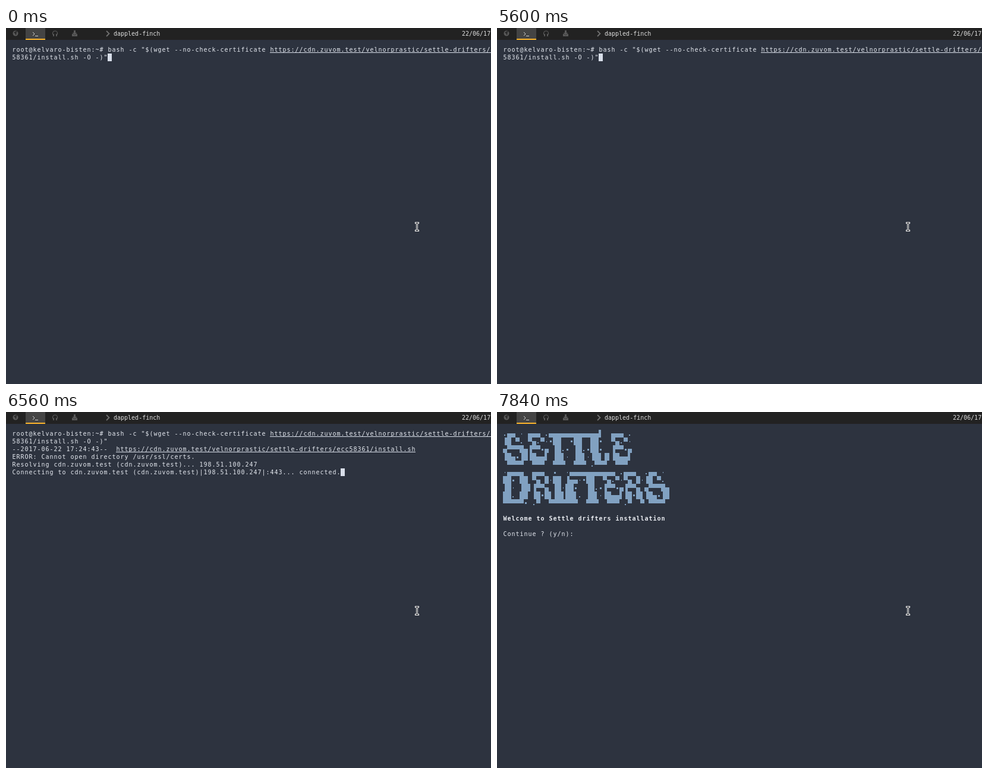
Recreate the animation shown at these times as an HTML page with a canvas. Size 816x600 px, loop 8 s.

```html
<!DOCTYPE html>
<html lang="en">
<head>
<meta charset="utf-8">
<title>Terminal installation</title>
<style>
html, body { margin: 0; width: 100%; height: 100%; overflow: hidden; background: #2d333f; }
canvas { display: block; }
</style>
</head>
<body>
<canvas id="stage" width="816" height="600"></canvas>
<script>
const ctx = document.getElementById('stage').getContext('2d');
const LOOP = 8000;
const CELL_W = 7, CELL_H = 13, LEFT = 10, TOP = 30;
const FONT = '"DejaVu Sans Mono", monospace';
const TEXT = '#e5e9f0', BLOCK = '#d8dee9', BLUE = '#81a1c1', GREY = '#595959';

const HOST = 'cdn.zuvom.test';
const IP = '198.51.100.247';
const URL_BASE = `https://${HOST}/velnorprastic/settle-drifters/`;
const FILE = 'ecc58361/install.sh';
const COMMAND = 'root@kelvaro-bisten:~# bash -c "$(wget --no-check-certificate ';
const STAMP = '--2017-06-22 17:24:43--  ';
const RESOLVING = `Resolving ${HOST} (${HOST})... `;
const CONNECTING = `Connecting to ${HOST} (${HOST})|${IP}|:443... connected.`;
const PROMPT = 'Continue ? (y/n): ';

const LETTERS = {
  S: ['.▄▄ · ', '▐█ ▀. ', '▄▀▀▀█▄', '▐█▄▪▐█', ' ▀▀▀▀ '],
  E: ['▄▄▄ .', '▀▄.▀·', '▐▀▀▪▄', '▐█▄▄▌', ' ▀▀▀ '],
  T: ['▄▄▄▄▄', '•██  ', ' ▐█.▪', ' ▐█▌·', ' ▀▀▀ '],
  L: ['▄▄▌  ', '██•  ', '██▪  ', '▐█▌▐▌', '.▀▀▀ '],
  D: ['·▄▄▄▄  ', '██▪ ██ ', '▐█· ▐█▌', '██. ██ ', '▀▀▀▀▀• '],
  R: ['▄▄▄  ', '▀▄ █·', '▐▀▀▄ ', '▐█•█▌', '.▀  ▀'],
  I: ['▪  ', '██ ', '▐█·', '▐█▌', '▀▀▀'],
  F: ['·▄▄▄', '▐▄▄·', '██▪ ', '██▌.', '▀▀▀ ']
};

// Position and size of each block character inside a cell
const BLOCKS = {
  '█': [0, 0, 7, 13], '▀': [0, 0, 7, 7], '▄': [0, 6, 7, 7],
  '▌': [0, 0, 4, 13], '▐': [3, 0, 4, 13],
  '.': [2, 8, 2, 2], '·': [3, 6, 1, 2], '▪': [2, 6, 3, 3], '•': [2, 5, 3, 3]
};

const colX = col => LEFT + col * CELL_W;
const rowY = row => TOP + row * CELL_H;

function rect(color, x, y, w, h) {
  ctx.fillStyle = color;
  ctx.fillRect(x, y, w, h);
}

function print(text, row, col = 0, { bold = false, underline = false } = {}) {
  ctx.font = `${bold ? 'bold ' : ''}10px ${FONT}`;
  ctx.fillStyle = bold ? '#eceff4' : TEXT;
  [...text].forEach((ch, i) => ctx.fillText(ch, colX(col + i) + 0.5, rowY(row) + 10));
  if (underline) rect(BLOCK, colX(col), rowY(row) + 11, text.length * CELL_W, 1);
}

function cursor(row, col) {
  rect(BLOCK, colX(col), rowY(row), CELL_W, CELL_H);
}

function banner(word, row) {
  let col = 0;
  for (const name of word) {
    const letter = LETTERS[name];
    letter.forEach((line, r) => [...line].forEach((ch, c) => {
      if (!BLOCKS[ch]) return;
      const [x, y, w, h] = BLOCKS[ch];
      rect(BLUE, colX(col + c) + x, rowY(row + r) + y, w, h);
    }));
    col += letter[0].length;
  }
}

function stroke(path, color, width) {
  ctx.strokeStyle = color;
  ctx.lineWidth = width;
  ctx.stroke(new Path2D(path));
}

function fill(path, color) {
  ctx.fillStyle = color;
  ctx.fill(new Path2D(path));
}

function statusBar() {
  rect('#222222', 0, 0, 816, 20);
  rect('#444444', 33, 0, 33, 20);
  rect('#ffb52a', 33, 18, 33, 2);

  // globe
  fill('M11.5 9a4.5 4.5 0 1 0 9 0a4.5 4.5 0 1 0-9 0', GREY);
  fill('M15 6l3-1 1 2-2 1 1 2-2 2-1-3-2-1z', '#2a2a2a');
  // prompt
  stroke('M45 7l3 3-3 3M49 13.5h5', '#d0d0d0', 1);
  // headphones
  stroke('M78.5 11v-2a4 4 0 0 1 8 0v2', GREY, 1.2);
  rect(GREY, 79, 10, 2, 4);
  rect(GREY, 84, 10, 2, 4);
  // download
  fill('M114 4h3v4h2.5l-4 4-4-4h2.5zM111 10h2l2.5 2.5 2.5-2.5h2v4h-9z', GREY);
  // chevron
  stroke('M169 5l4.5 4.5L169 14', '#707070', 1.8);

  ctx.font = `10px ${FONT}`;
  ctx.fillStyle = '#dfdfdf';
  ctx.fillText('dappled-finch', 181, 13);
  ctx.fillText('22/06/17', 767, 13);
}

function pointer() {
  const beam = 'M689.5 328.5h4M691.5 329v12M689.5 341.5h4';
  ctx.lineCap = 'square';
  stroke(beam, '#f4f4f4', 3);
  stroke(beam, '#15181e', 1);
  ctx.lineCap = 'butt';
}

function download(t) {
  const tail = '58361/install.sh -O -)"';
  print(COMMAND, 0);
  print(URL_BASE + 'ecc', 0, COMMAND.length, { underline: true });
  print(tail, 1);
  if (t < 6000) {
    if (t < 4320 || t >= 5600) cursor(1, tail.length);
    return;
  }
  print(STAMP, 2);
  print(URL_BASE + FILE, 2, STAMP.length, { underline: true });
  print('ERROR: Cannot open directory /usr/ssl/certs.', 3);
  print(RESOLVING, 4);
  if (t < 6320) {
    cursor(4, RESOLVING.length);
  } else {
    print(IP, 4, RESOLVING.length);
    print(CONNECTING, 5);
    cursor(5, CONNECTING.length);
  }
}

function welcome(t) {
  banner('SETTLE', 0);
  banner('DRIFTERS', 5);
  print('Welcome to Settle drifters installation', 11, 0, { bold: true });
  print(PROMPT, 13);
  if (t < 7120) cursor(13, PROMPT.length);
}

function draw(now) {
  const t = now % LOOP;
  rect('#2d333f', 0, 0, 816, 600);
  statusBar();
  (t < 6720 ? download : welcome)(t);
  pointer();
}

const start = performance.now();
function tick() {
  draw(performance.now() - start);
  requestAnimationFrame(tick);
}
tick();
</script>
</body>
</html>
```
